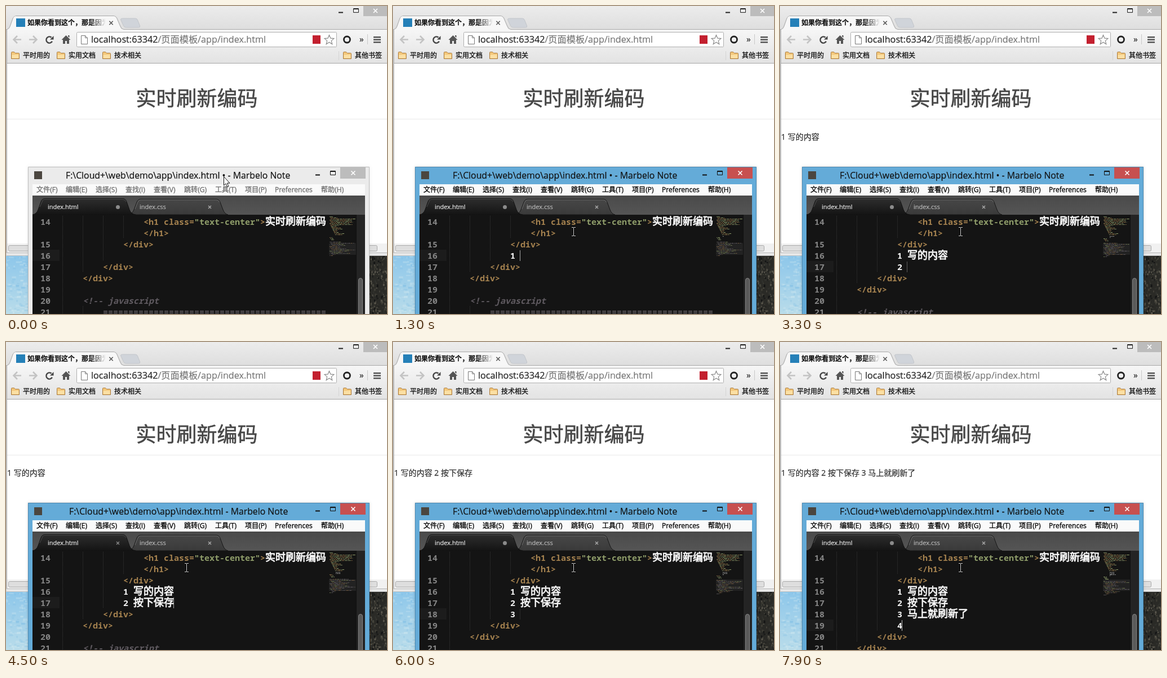
Animation of 676x546 px, one loop 8 s. Source, as an HTML page with a canvas:

```html
<!DOCTYPE html>
<html lang="zh-CN">
<head>
<meta charset="utf-8">
<style>
html, body { margin: 0; width: 100%; height: 100%; overflow: hidden; }
canvas { display: block; width: 676px; height: 546px; }
</style>
</head>
<body>
<canvas id="stage" width="676" height="546"></canvas>
<script>
const ctx = document.getElementById('stage').getContext('2d');
const UI = '"Open Sans", "Noto Sans CJK SC", sans-serif';
const MONO = '"Noto Sans Mono", "DejaVu Sans Mono", monospace';
const CJK = '"Noto Sans CJK SC", sans-serif';
const TAG = '#a5824f', STRING = '#8f9d6a', COMMENT = '#5f5a60', TEXT = '#f8f8f8';

const typed = '1 写的内容\n2 按下保存\n3 马上就刷新了\n4';
// [ms, characters typed so far]; a repeated count only restarts the caret blink
const keys = [[0, 0], [700, 1], [1000, 2], [1600, 4], [1700, 4], [2100, 6],
  [2600, 7], [2700, 8], [2800, 9], [2900, 9], [3500, 11], [3600, 11], [4100, 13], [4200, 13],
  [4800, 14], [5000, 15], [5100, 16], [6200, 18], [6400, 19], [7100, 22], [7700, 23], [7900, 24]];
const saves = [2250, 4500, 7400];

function box(x, y, w, h, color) {
  ctx.fillStyle = color;
  ctx.fillRect(x, y, w, h);
}
function path(d, fill, stroke, width = 1) {
  const p = new Path2D(d);
  if (fill) { ctx.fillStyle = fill; ctx.fill(p); }
  if (stroke) { ctx.strokeStyle = stroke; ctx.lineWidth = width; ctx.stroke(p); }
}
// A thin outline stands for a medium weight
function ink(s, x, y, color, outline) {
  ctx.fillStyle = ctx.strokeStyle = color;
  ctx.lineWidth = outline;
  ctx.fillText(s, x, y);
  if (outline) ctx.strokeText(s, x, y);
}
function text(s, x, y, size, color, outline = 0, weight = 400) {
  ctx.font = `${weight} ${size}px ${UI}`;
  ink(s, x, y, color, outline);
}
function arc(x, y, r, from, to, color, width) {
  ctx.beginPath();
  ctx.arc(x, y, r, from, to);
  ctx.strokeStyle = color;
  ctx.lineWidth = width;
  ctx.stroke();
}
function fade(y0, y1, a, b) {
  const g = ctx.createLinearGradient(0, y0, 0, y1);
  g.addColorStop(0, a);
  g.addColorStop(1, b);
  return g;
}
function cross(x, y, r, color, width) {
  path(`M${x - r} ${y - r}l${2 * r} ${2 * r}m0 ${-2 * r}l${-2 * r} ${2 * r}`, null, color, width);
}
function random(seed) {
  return () => (seed = seed * 16807 % 2147483647) / 2147483647;
}
const isWide = c => c > '\u2e80';
const cells = s => [...s].reduce((n, c) => n + (isWide(c) ? 2 : 1), 0);

// Monospaced run: 9 px per Latin cell, 18 px per CJK glyph
function code(s, x, y, color, italic = '') {
  for (const run of s.match(/[\u2e80-\uffff]+|[^\u2e80-\uffff]+/g) || []) {
    const wide = isWide(run[0]);
    ctx.font = wide ? `18px ${CJK}` : `${italic} 600 15px ${MONO}`;
    ink(run, x, y, color, wide ? .8 : 0);
    x += cells(run) * 9;
  }
  return x;
}

function desktop() {
  const rnd = random(77);
  box(0, 440, 60, 106, fade(440, 546, '#8cc6ea', '#b9dcea'));
  for (let i = 0; i < 110; i++)
    box(rnd() * 40, 443 + rnd() * 103, 2 + rnd() * 6, 1 + rnd() * 3, rnd() < .6 ? '#d8eaf044' : '#6fb4e033');
  box(640, 440, 36, 106, '#2a2a26');
  for (let i = 0; i < 220; i++)
    box(643 + rnd() * 33, 443 + rnd() * 103, 1 + rnd() * 2, 1 + rnd() * 4,
      ['#3f3e36', '#141515', '#5a574d', '#32332f'][rnd() * 4 | 0]);
}

function folder(x, label) {
  path(`M${x + .5} 93.5v-11q0-1 1-1h4l2 2h6q1 0 1 1v9z`, '#f3c77b', '#a9793c');
  path(`M${x + 1.5} 92.5v-6h12v6z`, '#fbe0a5');
  text(label, x + 21, 92, 12, '#111', .3);
}

function browser(t, loading, shield, content) {
  box(0, 0, 676, 443, '#e9e9e9');
  box(0, 0, 676, 42, fade(0, 42, '#ececec', '#dedede'));
  path('M590 11.5h8', null, '#222', 2);
  path('M616.5 4.5h9v7h-9z M616 5.5h10', null, '#222');
  box(634, 0, 42, 18, '#bcbcbc');
  cross(655.5, 8.5, 3.5, '#fff', 1.6);

  path('M203.5 24q0-2 3-2h23q3 0 4 3l4 10q1 3-2 3h-22q-4 0-5-3z', '#d0d4da', '#c2c5ca');
  box(0, 41, 676, 61, fade(41, 101, '#f6f6f6', '#e3e3e3'));
  path('M0 41.5H2Q5 41 7 36L12 22Q14 17.5 18 17.5H190Q195 17.5 197 22L203 36Q205 41.5 209 41.5H676', null, '#a9a9a9');
  path('M2 42.5Q6 41 8 36L13 22Q14 18 18 18H190Q194 18 196 22L202 36Q204 41 208 42.5z', '#f7f7f7');

  if (loading) {
    const a = (t - 2400) / 100 * .7 - Math.PI / 2;
    arc(26, 30, 6, a, a + 2.4, '#9db4dc', 2);
  } else box(18, 22, 16, 15, '#2580b8');
  const g = ctx.createLinearGradient(148, 0, 177, 0);
  g.addColorStop(0, '#111');
  g.addColorStop(1, '#1110');
  text('如果你看到这个，那是因为', 38, 34, 12, g, .2, 700);
  cross(186.5, 30, 3.2, '#555', 1.6);

  path('M27 59.5H14M20 53l-6.5 6.5 6.5 6.5', null, '#c3c3c3', 2.6);
  path('M41 59.5H54M48 53l6.5 6.5-6.5 6.5', null, '#c3c3c3', 2.6);
  if (loading) cross(77, 59.5, 5, '#444', 3);
  else {
    arc(77, 60, 5.6, .5, 5.4, '#444', 2.4);
    path('M84.5 53v6.5h-6.5z', '#444');
  }
  path('M98.5 60l8-8 8 8h-2.5v7h-4v-5h-3v5h-4v-7z M110 52h2.5v4l-2.5-2z', '#555');

  path('M127.5 46.5h458q1 0 1 1v24q0 1-1 1h-458q-2 0-2-2v-22q0-2 2-2z', '#fff', '#aeaeae');
  path('M133.5 52.5h7l4 4v11h-11z M140.5 52.5v4h4', '#fff', '#777');
  const host = 'localhost:63342';
  text(host, 151, 65, 16.2, '#222', .2);
  text('/页面模板/app/index.html', 151 + ctx.measureText(host).width, 65, 16.2, '#777', .2);
  if (shield) box(544, 52, 14, 15, '#c3202f');
  path('M573.5 51.5l2.4 5.6 6 .5-4.6 4 1.5 6-5.3-3.3-5.3 3.3 1.5-6-4.6-4 6-.5z', '#fff', '#8d8d8d', 1.2);
  arc(605, 59.5, 5.5, 0, 7, '#222', 2.8);
  text('»', 627, 64, 14, '#333', 0, 600);
  box(641, 50, 1, 18, '#c8c8c8');
  for (let i = 0; i < 3; i++) box(652, 54 + i * 4.5, 13, 2.5, '#555');

  folder(9, '平时用的');
  folder(90, '实用文档');
  folder(171, '技术相关');
  box(590, 80, 1, 16, '#d4d4d4');
  folder(598, '其他书签');
  box(0, 101, 676, 1, '#a6a6a6');

  box(2, 102, 674, 319, '#fff');
  text('实时刷新编码', 230.5, 176.5, 36, '#484848', .6);
  box(2, 200, 674, 1, '#eaeaea');
  text(content, 2, 237, 14, '#333', .25);
  box(2, 421, 674, 16, '#f1f1f1');
  path('M6.5 424.5h650q2 0 2 2v6q0 2-2 2h-650q-2 0-2-2v-6q0-2 2-2z', '#dedede', '#aaa');
  box(0, 437, 676, 1, '#b5b5b5');
  box(0, 442, 676, 1, '#c4c4c4');
  box(0, 42, 1, 400, '#c8c8c8');
  box(1, 42, 1, 395, '#a9a9a9');
}

function minimap(lines) {
  const rnd = random(4242);
  box(573, 421, 48, 20, '#222');
  const row = (x, y, w, colors) => {
    for (let end = Math.min(x + w, 620); x < end;) {
      const n = Math.min(1 + rnd() * 5, end - x);
      box(x, y, n, 1, colors[rnd() * colors.length | 0]);
      x += n + 1;
    }
  };
  const warm = ['#8d7448', '#75805a', '#8f9d6a', '#7d6340'];
  for (let i = 0; i < 17; i++) {
    const wide = i > 1 && i < 8;
    row(574 + (i < 9 ? i % 3 : i - 6), 373 + i * 2, wide ? 34 + rnd() * 12 : 6 + rnd() * 12, warm);
  }
  lines.forEach((s, i) => { if (s) row(585, 408 + i * 2, cells(s) * .8, ['#bbb', '#999']); });
  const y = 408 + lines.length * 2;
  for (let i = 0; i < 17; i++) {
    if (i === 3) continue;
    const band = i === 5 || i === 11;
    row(574 + (i % 4) * 1.5, y + i * 2, i < 3 ? 6 : band ? 44 : i > 14 ? 6 : 14 + rnd() * 26,
      i < 3 ? warm : ['#4d4a4c', '#5f5a60', '#6b7350', '#6b5640']);
  }
}

function sourceRows(lines, caret) {
  const rows = [
    [14, 4, [['<h1 class=', TAG], ['"text-center"', STRING], ['>', TAG], ['实时刷新编码', TEXT]]],
    ['', 4, [['</h1>', TAG]]],
    [15, 3, [['</div>', TAG]]],
    ...lines.map((s, i) => [16 + i, 3, [[s, TEXT]]])
  ];
  let n = 16 + lines.length;
  rows.push([n++, 2, [['</div>', TAG]]], [n++, 1, [['</div>', TAG]]], [n++, 1, []],
    [n++, 1, [['<!-- javascript', COMMENT, 'italic']]],
    [n++, 2, [['='.repeat(44), COMMENT]]]);

  const current = 2 + lines.length;
  box(47, 372 + current * 20, 48, 20, '#1c1c1c');
  rows.forEach(([number, depth, runs], i) => {
    const y = 388 + i * 20;
    ctx.setLineDash([1, 1]);
    for (let d = 0; d < depth; d++) path(`M${100.5 + d * 36} ${y - 16}v20`, null, '#363636');
    ctx.setLineDash([]);
    code(String(number), 61, y, '#858585');
    let x = 100 + depth * 36;
    for (const [s, color, style] of runs) x = code(s, x, y, color, style);
    if (i === current && caret) {
      ctx.globalAlpha = caret;
      box(x - 1, y - 15, 1, 19, '#c4c4c4');
      ctx.globalAlpha = 1;
    }
  });
}

function editor(active, dirty, lines, caret) {
  const mix = (a, b) => a + (b - a) * active | 0;
  const rgb = (a, b) => `rgb(${a.map((v, i) => mix(v, b[i]))})`;
  ctx.shadowColor = `rgba(0,0,0,${.1 + active * .1})`;
  ctx.shadowBlur = 4;
  box(39, 285, 606, 270, rgb([235, 235, 235], [100, 171, 216]));
  ctx.shadowBlur = 0;
  path('M39.5 546V285.5H644.5V546', null, rgb([190, 190, 190], [75, 136, 176]));

  box(50, 293, 14, 14, '#4b4640');
  text(`F:\\Cloud+\\web\\demo\\app\\index.html ${dirty ? '• ' : ''}- Marbelo Note`, dirty ? 106 : 112, 306, 15.8, '#111', .2);
  path('M549 299.5h8', null, '#111', 2);
  path('M575.5 292.5h9v7h-9z M575 293.5h10', null, '#111');
  box(593, 286, 45, 20, rgb([188, 188, 188], [199, 80, 80]));
  cross(616, 296, 3.5, '#fff', 1.6);

  box(47, 316, 590, 20, '#fafafa');
  const menus = ['文件(F)', '编辑(E)', '选择(S)', '查找(I)', '查看(V)', '跳转(G)', '工具(T)', '项目(P)', 'Preferences', '帮助(H)'];
  const left = [54, 106, 159, 212, 262, 316, 371, 424, 477, 559];
  menus.forEach((s, i) => text(s, left[i], 330, 12.1, active ? '#000' : '#6d6d6d', .3));

  box(47, 336, 590, 34, fade(336, 370, '#4a4a4a', '#555'));
  path('M216 370Q224 369 227 361L232 348Q234 342.5 239 342.5H373Q378 342.5 380 348L385 361Q388 369 394 370z',
    fade(342, 370, '#474747', '#3a3a3a'), '#161616');
  path('M229 360L233 349Q235 343.5 239 343.5H373Q377 343.5 379 348', null, '#6c6c6c');
  path('M47 370Q54 369 57 361L62 347Q64 341.5 69 341.5H207Q212 341.5 214 347L219 361Q222 369 230 370z',
    fade(342, 370, '#2d2d2d', '#141414'), '#111');
  path('M60 356L64 347Q65 342.5 69 342.5H207Q211 342.5 213 347', null, '#4a4a4a');
  text('index.html', 74, 360, 11, '#eee', .2);
  text('index.css', 237, 360, 11, '#bbb', .2);
  if (dirty) {
    ctx.beginPath();
    ctx.arc(198.5, 356.5, 3.5, 0, 7);
    ctx.fillStyle = '#8b8b8b';
    ctx.fill();
  } else cross(198.5, 356.5, 2.5, '#8b8b8b', 1.4);
  cross(361.5, 356.5, 2.5, '#aaa', 1.4);

  box(47, 370, 590, 176, '#141414');
  sourceRows(lines, caret);
  minimap(lines);
  box(621, 370, 16, 176, '#242424');
  box(621, 370, 1, 176, '#111');
  path('M625.5 560V486Q625.5 482.5 629 482.5T632.5 486V560z', '#5a5a5a', '#858585');
}

function pointer(t) {
  if (t < 100) {
    path('M386.5 302.5v15.5l3.5-3.2 2.8 6 2.3-1-2.7-5.8h4.6z', '#fff', '#111');
    return;
  }
  const k = Math.min(1, Math.max(0, (t - 300) / 200));
  const x = Math.round(204 + 116 * k) + .5, y = Math.round(428 - 28 * k);
  const d = `M${x - 3.5} ${y - 7.5}h3l.5 1 .5-1h3M${x} ${y - 7}v14M${x - 3.5} ${y + 7.5}h3l.5-1 .5 1h3`;
  path(d, null, '#000', 3);
  path(d, null, '#ddd', 1);
}

function caretAlpha(t, last) {
  if (t < 300) return 0;
  const age = Math.max(0, t - Math.max(300, last)) % 1200;
  if (age < 300) return 1;
  return { 300: .85, 400: .4, 900: .12, 1000: .45, 1100: .85 }[age] || 0;
}

function draw(t) {
  const [last, count] = keys.findLast(k => k[0] <= t);
  const within = (from, to) => saves.some(s => t >= s + from && t < s + to);
  const shown = saves.filter(s => t >= s + 300).length;
  desktop();
  browser(t, within(100, 300), !within(300, 550), typed.split('\n').slice(0, shown).join(' '));
  const active = Math.min(1, Math.max(0, (t - 200) / 400));
  editor(active, !within(0, 300), typed.slice(0, count).split('\n'), caretAlpha(t, last));
  pointer(t);
}

let shownStep = -1;
function tick() {
  const step = Math.floor(performance.now() % 8000 / 100);
  if (step !== shownStep) draw((shownStep = step) * 100);
  requestAnimationFrame(tick);
}
tick();
</script>
</body>
</html>
```
